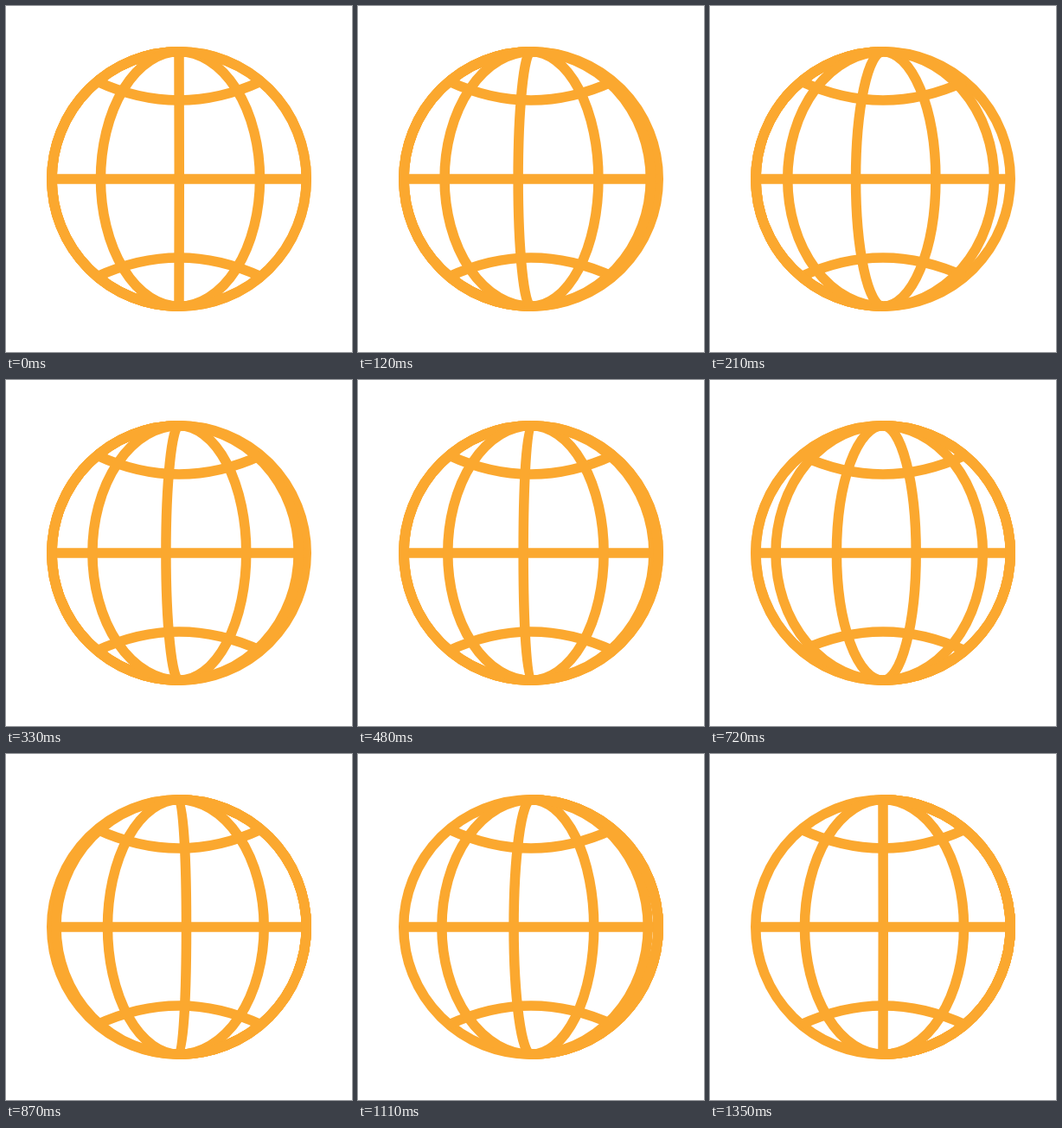
An HTML page without scripts that plays this animation: 400 px wide and 400 px high, repeating every 1.41 s.

```html
<!DOCTYPE html>
<html lang="en">
<head>
<meta charset="utf-8">
<title>Spinning globe</title>
<style>
  @property --tick { syntax: "<number>"; inherits: true; initial-value: 0; }
  @property --back { syntax: "<number>"; inherits: true; initial-value: 0; }
  @property --rest { syntax: "<number>"; inherits: true; initial-value: 1; }
  @property --turn { syntax: "<number>"; inherits: true; initial-value: 0; }
  @property --pos  { syntax: "<number>"; inherits: false; initial-value: 0; }

  html, body { margin: 0; width: 100%; height: 100%; overflow: hidden; background: #fff; }

  svg {
    display: block;
    width: 100%;
    height: 100%;
    fill: none;
    stroke: #fba82f;
    stroke-width: 11.5;
    animation: tick 1410ms steps(47) infinite;

    /* A short wind-up to the left, then a decelerating spin to the right. */
    --back: clamp(0, var(--tick) / 9, 1);
    --rest: clamp(0, (45 - var(--tick)) / 36, 1);
    --turn: calc(4
      - 0.4 * var(--back) * var(--back) * (3 - 2 * var(--back))
      - 4.4 * var(--rest) * var(--rest) * (1 + 0.11 * var(--rest) * (1 - pow(var(--rest), 16)))
      + 0.4 * 1);
    --turn: calc(
      -0.4 * var(--back) * var(--back) * (3 - 2 * var(--back))
      + 4.4 * (1 - var(--rest) * var(--rest) * (1 + 0.11 * var(--rest) * (1 - pow(var(--rest), 16)))));
  }

  @keyframes tick { from { --tick: 0; } to { --tick: 47; } }

  /* Stops across the globe: left rim, left, middle, right, right rim.
     The tiny offset keeps the middle line from collapsing. */
  .meridian {
    --pos: calc(var(--slot) + var(--turn));
    vector-effect: non-scaling-stroke;
    transform: scaleX(calc(-0.998
      + 0.383 * clamp(0, var(--pos), 1)
      + 0.617 * clamp(0, var(--pos) - 1, 1)
      + 0.633 * clamp(0, var(--pos) - 2, 1)
      + 0.365 * clamp(0, var(--pos) - 3, 1)));
  }
</style>
</head>
<body>
<svg viewBox="-200 -200 400 400">
  <defs>
    <path id="arc" d="M0-147.25A147.25 147.25 0 0 1 0 147.25"/>
  </defs>
  <circle r="147.25"/>
  <path d="M-147 0H147M-95-113Q0-69 95-113M-95 113Q0 69 95 113"/>
  <path class="meridian" style="--slot:-3" d="M0-147.25A147.25 147.25 0 0 1 0 147.25"/>
  <path class="meridian" style="--slot:-2" d="M0-147.25A147.25 147.25 0 0 1 0 147.25"/>
  <path class="meridian" style="--slot:-1" d="M0-147.25A147.25 147.25 0 0 1 0 147.25"/>
  <path class="meridian" style="--slot:0" d="M0-147.25A147.25 147.25 0 0 1 0 147.25"/>
  <path class="meridian" style="--slot:1" d="M0-147.25A147.25 147.25 0 0 1 0 147.25"/>
  <path class="meridian" style="--slot:2" d="M0-147.25A147.25 147.25 0 0 1 0 147.25"/>
  <path class="meridian" style="--slot:3" d="M0-147.25A147.25 147.25 0 0 1 0 147.25"/>
  <path class="meridian" style="--slot:4" d="M0-147.25A147.25 147.25 0 0 1 0 147.25"/>
</svg>
</body>
</html>
```
